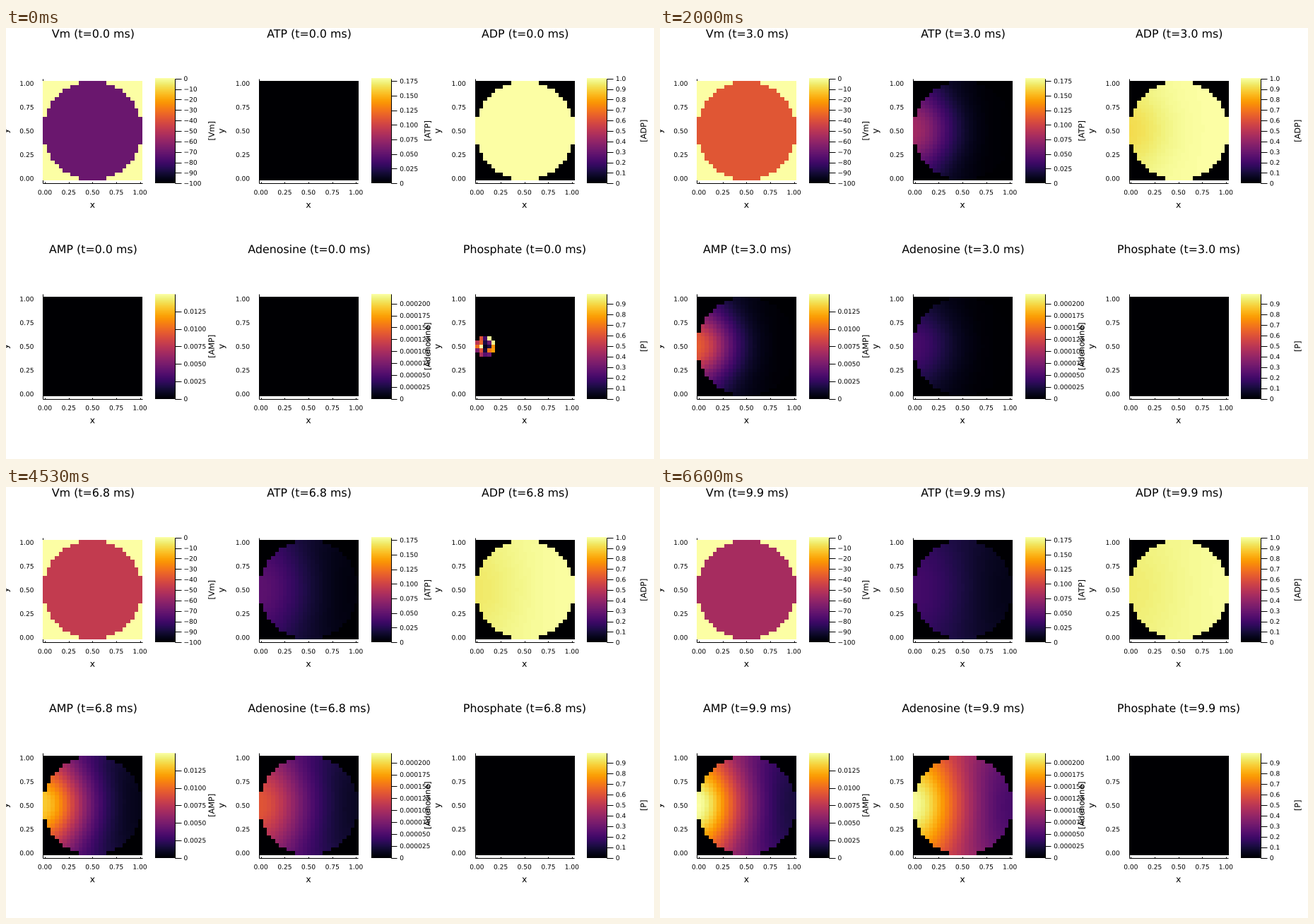
A matplotlib script that plays this animation: 917 by 611 pixels, repeating every 6.67 s.

```python
import numpy as np
import matplotlib.pyplot as plt
from matplotlib.animation import FuncAnimation
from matplotlib.collections import LineCollection
from matplotlib.patches import PathPatch
from matplotlib.path import Path
from matplotlib.textpath import TextPath
from matplotlib.transforms import Affine2D

W, H, DPI = 917, 611, 128
PX = 72 / DPI
FRAMES, T_END = 100, 10.0
N = 25
TITLE, GUIDE, BAR_TITLE, TICK = 15.85, 12.45, 11.32, 9.06

plt.rcParams["font.family"] = "DejaVu Sans"
inferno = plt.get_cmap("inferno")

# name, bar title, low, high, tick step, decimals
PANELS = [
    ("Vm", "[Vm]", -100, 0, 10, 0),
    ("ATP", "[ATP]", 0, 0.1792, 0.025, 3),
    ("ADP", "[ADP]", 0, 1, 0.1, 1),
    ("AMP", "[AMP]", 0, 0.01497, 0.0025, 4),
    ("Adenosine", "[Adenosine]", 0, 0.00022, 0.000025, 6),
    ("Phosphate", "[P]", 0, 0.993, 0.1, 1),
]

# ---- reaction and diffusion on a disc with closed walls ----
row, col = np.mgrid[:N, :N] - N // 2
MASK = row**2 + col**2 <= 12.5**2

PATCH = [
    [0, 0.60, 0.20, 0.98, 0],
    [0.50, 0.65, 0.12, 0.30, 0.97],
    [0.68, 0.99, 0.05, 0.12, 0.75],
    [0.35, 0.60, 0.10, 0.70, 0.78],
    [0, 0.45, 0.25, 0.30, 0],
]


def simulate(substeps=50):
    """Phosphate turns into ATP, which feeds AMP, which feeds adenosine.

    Diffusion is diagonal in the eigenmodes of the disc's Laplacian.
    """
    cells = np.argwhere(MASK)
    near = np.abs(cells[:, None] - cells[None]).sum(-1) == 1
    lam, modes = np.linalg.eigh(np.diag(near.sum(1)) - near.astype(float))

    start = np.zeros((N, N))
    start[10:15, :5] = PATCH
    q = np.zeros((4, len(cells)))
    q[0] = start[MASK] @ modes

    dt = T_END / (FRAMES - 1) / substeps
    burn = 10
    keep = 1 - dt * np.outer([100, 5.4, 1.5, 9], lam)
    keep[0] -= dt * burn
    feed = dt * np.array([[burn], [1], [1]])
    history = [q]
    for _ in range(FRAMES - 1):
        for _ in range(substeps):
            gain = feed * q[:3]
            q = keep * q
            q[1:] += gain
        history.append(q)

    fields = np.zeros((4, FRAMES, N, N))
    fields[:, :, MASK] = np.swapaxes(history, 0, 1) @ modes.T
    return np.clip(fields, 0, None)


def scaled(u, top, power=1.0):
    return (u / u.max()) ** power * top


phos, atp, amp, ado = simulate()
atp = scaled(atp, PANELS[1][3])
amp = scaled(amp, PANELS[3][3], 0.85)
ado = scaled(ado, PANELS[4][3], 0.9)
adp = np.where(MASK, 1 - atp - amp - ado, 0)

times = np.linspace(0, T_END, FRAMES)
volts = np.interp(
    times,
    [0, 0.9, 1.2, 1.6, 2.0, 2.4, 2.9, 3.4, 4.1, 5.7, 7.0, 8.1, 9.0, 10],
    [-70, -69.7, -67, -61, -52.5, -45, -39, -37, -38, -43.5, -48.7, -52.5, -54.3, -55.5],
)
vm = np.where(MASK, volts[:, None, None], 0)
FIELDS = [vm, atp, adp, amp, ado, phos]

# ---- drawing, in pixels with y pointing down ----
fig = plt.figure(figsize=(W / DPI, H / DPI), dpi=DPI, facecolor="white")
ax = fig.add_axes([0, 0, 1, 1])
ax.axis("off")


def text(s, size, x, y, align=0.5, upright=False):
    path = TextPath((0, 0), s, size=size)
    shift = 0
    if align:
        ink = path.vertices[path.codes != Path.CLOSEPOLY, 0]
        shift = ink.min() + align * np.ptp(ink)
    move = Affine2D().translate(-shift, 0).scale(1, -1)
    if upright:
        move.rotate_deg(-90)
    return path.transformed(move.translate(x, y))


def add_ink(paths):
    ink = PathPatch(Path.make_compound_path(*paths), fc="black", lw=0,
                    snap=False, zorder=4)
    return ax.add_artist(ink)


def add_lines(lines, zorder):
    ax.add_collection(LineCollection(lines, colors="black", linewidths=PX,
                                     zorder=zorder), autolim=False)


def colors(data, lo, hi):
    return inferno((data - lo) / (hi - lo), bytes=True)


def image(rgba, x0, y0, x1, y1):
    return ax.imshow(rgba, aspect="auto", interpolation="nearest",
                     extent=(x0, x1, y1, y0), zorder=2)


def tick_label(v, decimals):
    if abs(v) < 1e-9:
        return "0"
    return f"{v:.{decimals}f}".replace("-", "\u2212")


def build(i, spec):
    name, bar_title, lo, hi, step, decimals = spec
    ox, oy = i % 3 * W / 3, i // 3 * H / 2
    left, right = ox + 52.2, ox + 192.5
    top, bottom = oy + 71.7, oy + 220.2
    mid_x, mid_y = (left + right) / 2, (top + bottom) / 2
    unit = (right - left) * (N - 1) / N

    heat = image(colors(FIELDS[i][0], lo, hi),
                 left, mid_y - 70.15, right, mid_y + 70.15)
    frame = [[(left, top), (left, bottom)], [(left, bottom), (right, bottom)]]
    labels = [text("x", GUIDE, mid_x, oy + 254.8),
              text("y", GUIDE, ox + 3.3, mid_y, upright=True)]
    for v in np.linspace(0, 1, 5):
        x, y = mid_x + (v - 0.5) * unit, mid_y - (v - 0.5) * unit
        frame.append([(x, bottom), (x, bottom - 2)])
        labels.append(text(f"{v:.2f}", TICK, x, bottom + 16))
        labels.append(text(f"{v:.2f}", TICK, ox + 38.8, y + 3.3, align=1))

    bar = ox + 239
    image(colors(np.linspace(1, 0, 256)[:, None], 0, 1), ox + 211, top, bar, bottom)
    scale = [[(bar, top), (bar, bottom)]]
    for v in np.arange(lo, hi + step * 1e-6, step):
        y = bottom - (v - lo) / (hi - lo) * (bottom - top)
        scale.append([(bar, y), (bar + 8.5, y)])
        labels.append(text(tick_label(v, decimals), TICK, ox + 251.5, y + 3.3, align=0))
    labels.append(text(bar_title, BAR_TITLE, ox + 294.8, mid_y - 0.2, upright=True))

    add_lines(frame, 1)
    add_lines(scale, 3)
    add_ink(labels)
    return heat, (mid_x + 0.4, oy + 13.6)


def title_paths(k):
    return [text(f"{spec[0]} (t={times[k]:.1f} ms)", TITLE, *pos)
            for spec, (_, pos) in zip(PANELS, views)]


views = [build(i, spec) for i, spec in enumerate(PANELS)]
titles = add_ink(title_paths(0))
ax.set_xlim(0, W)
ax.set_ylim(H, 0)


def update(k):
    for (heat, _), spec, field in zip(views, PANELS, FIELDS):
        heat.set_data(colors(field[k], spec[2], spec[3]))
    titles.set_path(Path.make_compound_path(*title_paths(k)))
    return []


anim = FuncAnimation(fig, update, frames=FRAMES, interval=66.7,
                     repeat=True, repeat_delay=0)
plt.show()
```
